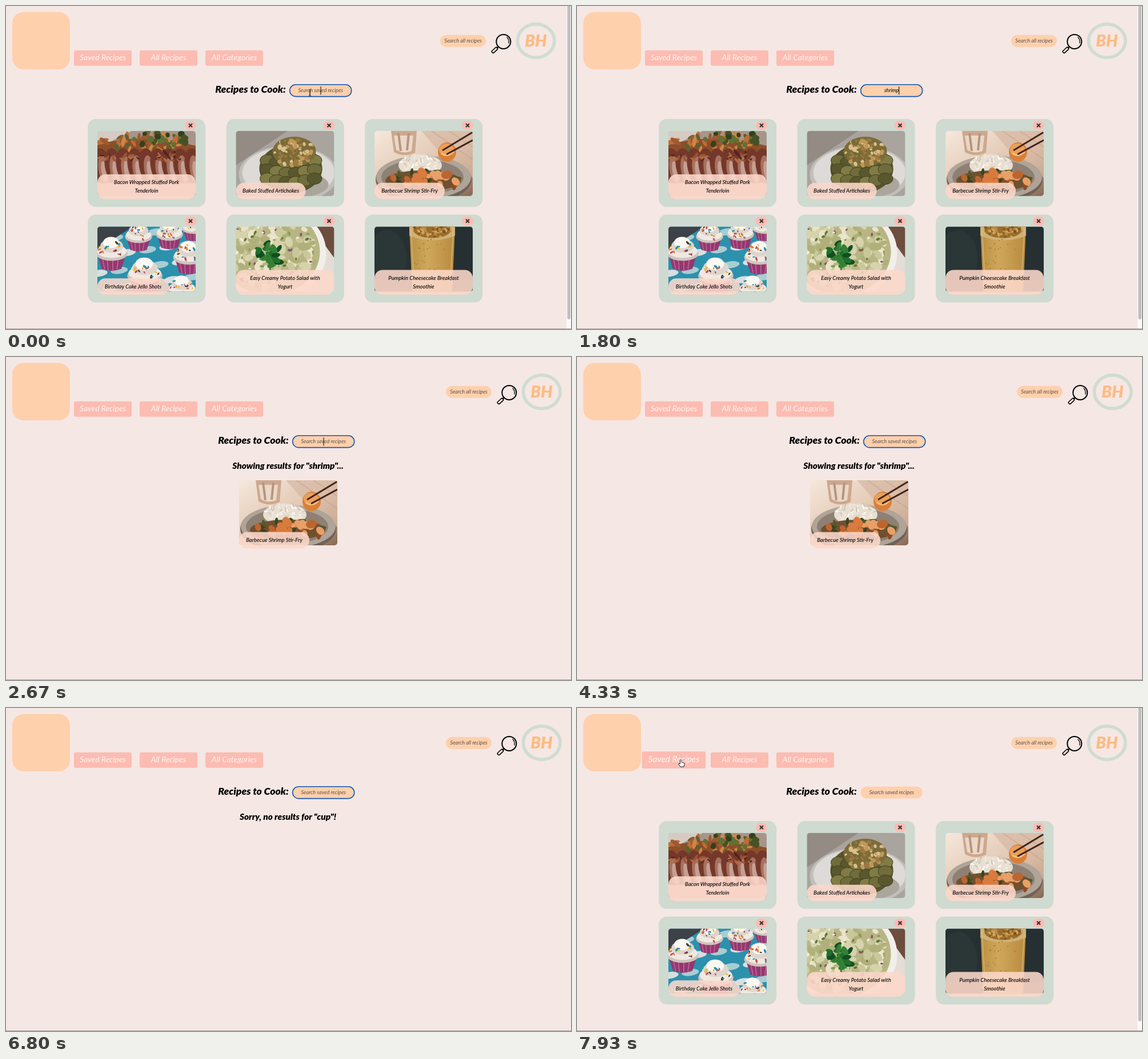
An HTML page for the animation above (8 s loop, 989 px wide and 566 px high).

```html
<!DOCTYPE html>
<html lang="en">
<head>
<meta charset="utf-8">
<title>Recipes to Cook</title>
<style>
  html, body { margin: 0; width: 100%; height: 100%; overflow: hidden; background: #f5e7e4; }
  svg { display: block; width: 100%; height: 100%; }
  text { font: italic 9.5px Lato, "Open Sans", sans-serif; text-anchor: middle; }
  .nav rect, .close rect { fill: #fcbcb2; }
  .nav text { font-size: 13.9px; fill: #fff4f0; }
  .heading { font-size: 17.7px; font-weight: 900; }
  .message { font-size: 15.4px; font-weight: 900; }
  .hint { font-size: 9.2px; fill: #5c504a; }
  .typed { font-size: 9px; }
  .initials { font-size: 28.5px; font-weight: 900; fill: #febb81; }
  .caption rect { fill: #fdd9cb; fill-opacity: .88; }
  .caption text { font-weight: 500; }
  .line { fill: none; stroke: #000; stroke-width: 2; stroke-linecap: round; }
</style>
</head>
<body>
<svg id="stage" viewBox="0 0 989 566" preserveAspectRatio="none"></svg>
<script>
const LOOP = 8000;
const stage = document.getElementById('stage');

const box = (x, y, w, h, r, fill) =>
  `<rect x="${x}" y="${y}" width="${w}" height="${h}" rx="${r}" fill="${fill}"/>`;
const oval = (x, y, rx, ry, fill, extra = '') =>
  `<ellipse cx="${x}" cy="${y}" rx="${rx}" ry="${ry}" fill="${fill}" ${extra}/>`;
const shape = (d, fill, extra = '') => `<path d="${d}" fill="${fill}" ${extra}/>`;
const label = (x, y, words, cls = '', id = '') =>
  `<text x="${x}" y="${y}" class="${cls}" ${id && `id="${id}"`}>${words}</text>`;
const range = n => [...Array(n).keys()];

function randomizer(seed) {
  return () => (seed = (seed * 16807) % 2147483647) / 2147483647;
}

// Fills an oval area with small randomly turned flecks.
function scatter(seed, count, [x, y, rx, ry], [w, h], colors) {
  const rnd = randomizer(seed * 7919);
  return range(count).map(i => {
    const angle = rnd() * 6.283, reach = Math.sqrt(rnd()), k = .6 + rnd() * .7;
    const px = (x + Math.cos(angle) * reach * rx).toFixed(1);
    const py = (y + Math.sin(angle) * reach * ry).toFixed(1);
    return oval(px, py, (w * k).toFixed(1), (h * k).toFixed(1), colors[i % colors.length],
      `transform="rotate(${Math.round(rnd() * 180)} ${px} ${py})"`);
  }).join('');
}

function pork() {
  const slices = range(9).map(i => {
    const x = 8 + i * 20;
    return oval(x, 61, 15, 31, '#74382a', `transform="rotate(-9 ${x} 61)"`) +
      oval(x + 3, 68, 9, 25, '#a87060', `transform="rotate(-9 ${x} 68)"`) +
      oval(x + 4, 71, 5, 18, '#c4a092', `transform="rotate(-9 ${x} 71)"`);
  }).join('');
  return box(0, 0, 172, 114, 0, '#a8958a') + shape('M0 0H60L0 30Z', '#d5cbc3') +
    shape('M0 24Q75 2 172 26V70H0Z', '#8d4e2a') +
    scatter(3, 42, [78, 19, 76, 15], [9, 3.5], ['#c06d34', '#9c5a32', '#5f602d', '#cf8545']) +
    scatter(5, 20, [108, 14, 54, 13], [6, 5], ['#465125', '#627033', '#343f1d']) +
    box(0, 39, 172, 51, 0, '#73382a') + slices +
    scatter(7, 28, [86, 46, 86, 10], [6, 2], ['#9b5436', '#542519', '#ae6943']) +
    box(0, 92, 172, 22, 0, '#d8b9ac');
}

function artichoke() {
  const leaves = range(3).map(r => range(6).map(i => {
    const x = 55 + i * 16.5, y = 59 + r * 16 - Math.abs(i - 2.5) * 3;
    return oval(x, y, 13, 10, ['#706c3b', '#59572d', '#817b45'][(i + r) % 3],
      'stroke="#424020" stroke-width="1"');
  }).join('')).join('');
  return box(0, 0, 172, 114, 0, '#aaa49e') + shape('M0 0H90L0 60Z', '#938b84') +
    oval(92, 76, 87, 50, '#c2bfba') + oval(92, 73, 81, 45, '#dddad7') +
    oval(102, 94, 60, 23, '#aaa69d') + oval(96, 66, 55, 43, '#57532d') + leaves +
    oval(102, 36, 38, 26, '#7c6c3a') +
    scatter(8, 85, [102, 36, 36, 25], [4, 3], ['#bd9858', '#dbc08a', '#9e783f', '#776a36']);
}

function shrimp() {
  return box(0, 0, 172, 114, 0, 'url(#table)') + shape('M82 0H172V82L115 38Z', '#d8b8a3', 'opacity=".7"') +
    shape('M100 0L172 50M130 0L172 28', 'none', 'stroke="#c4a08b" stroke-width="2" opacity=".5"') +
    shape('M29 0H74L71 38Q52 47 34 37Z', '#cda88d') + shape('M34 8H68L65 35Q50 41 38 33Z', '#ead8c8') +
    shape('M42 4L46 35M60 4L57 34', 'none', 'stroke="#b7957f" stroke-width="4"') +
    oval(86, 85, 84, 41, '#6f6259') + oval(86, 81, 83, 38, '#b0a397') + oval(84, 81, 72, 31, '#8f8074') +
    oval(80, 60, 38, 19, '#e8dfd3') +
    scatter(2, 55, [80, 58, 37, 17], [4, 1.4], ['#fffaf1', '#d3c6b6', '#f1e7da']) +
    oval(85, 87, 66, 18, '#70502f') +
    scatter(6, 17, [88, 85, 62, 15], [10, 4], ['#39451f', '#525a2a', '#8d4c24']) +
    scatter(13, 20, [87, 84, 60, 12], [8, 6], ['#d97b3e', '#e8a068', '#bd6530']) +
    oval(127, 37, 16, 17, '#d98038') + oval(126, 33, 13, 11, '#eaa05a') +
    shape('M117 39Q128 47 139 36', 'none', 'stroke="#f8bc79" stroke-width="3"') +
    shape('M119 34L172 2M126 41L172 16', 'none', 'stroke="#41251d" stroke-width="3"');
}

function cupcake(x, y, size, seed) {
  return `<g transform="translate(${x} ${y}) scale(${size})">` +
    shape('M-25 3H25L17 29Q0 36 -17 29Z', '#93386f') +
    shape('M-17 8L-12 30M-8 9L-6 32M2 9V33M12 9L9 31', 'none', 'stroke="#bd5c95" stroke-width="2"') +
    oval(0, 2, 28, 13, '#cfc4bd') + oval(0, -2, 26, 12, '#efe9e2') +
    oval(0, -11, 20, 12, '#ded5ce') + oval(-1, -17, 14, 10, '#fbf8f2') +
    scatter(seed, 15, [0, -5, 23, 15], [3, 1.5], ['#e37b36', '#328fa6', '#c64961', '#e4bf39', '#48372f']) + '</g>';
}

function cupcakes() {
  const tiles = range(24).map(i =>
    oval((i % 6) * 36 - (i / 6 & 1) * 18, 12 + (i / 6 | 0) * 29, 15, 6,
      i % 2 ? '#a8cdd2' : '#d8dfdf', 'transform="rotate(-8 86 57)"')).join('');
  return box(0, 0, 172, 114, 0, '#2c91ad') + tiles + shape('M0 0H62L0 40Z', '#3d4148') +
    cupcake(72, 16, .85, 2) + cupcake(126, 12, .85, 4) + cupcake(168, 2, .72, 12) +
    cupcake(25, 45, 1, 7) + cupcake(160, 52, .98, 9) + cupcake(83, 84, 1.1, 11) + cupcake(148, 110, .9, 15);
}

function salad() {
  return box(0, 0, 172, 114, 0, '#e3ddd6') + shape('M132 0H172V55Z', '#6c4d3e') +
    oval(64, 46, 94, 82, '#f2efea') + oval(60, 44, 87, 76, '#b7b584') +
    scatter(4, 130, [61, 46, 80, 66], [9, 6], ['#d6d3ac', '#e9e3c8', '#b0b07a', '#c9c89b']) +
    scatter(9, 75, [61, 46, 80, 64], [3, 1.8], ['#5f7636', '#8b9c51', '#8c5275', '#f0eed9']) +
    scatter(17, 26, [58, 49, 23, 21], [9, 4.5], ['#20702c', '#0f4f22', '#347f36']) +
    shape('M56 48L70 70M56 48L40 58M56 48L59 28', 'none', 'stroke="#4c9339" stroke-width="1.2"');
}

function smoothie() {
  return box(0, 0, 172, 114, 0, '#263032') + oval(22, 56, 34, 50, '#2b3636') + box(0, 94, 172, 20, 0, '#4b4440') +
    shape('M61 0H141L136 114H66Z', 'url(#drink)') + shape('M61 0H141V16Q101 32 61 16Z', '#cfb175') +
    oval(101, 6, 33, 14, '#9b6e2c') +
    scatter(12, 70, [101, 5, 34, 14], [3, 2], ['#bc8b43', '#805321', '#d0a45c']) +
    scatter(21, 35, [101, 60, 32, 43], [1, 1], ['#aa7c36']) +
    shape('M64 4L70 110M138 4L132 110', 'none', 'stroke="#dcc07e" stroke-width="1.6" opacity=".7"');
}

// A photo with its caption; the caption hangs below the picture's edge.
function dish(photo, lines, width) {
  const h = 14 + 14.7 * lines.length;
  return `<g clip-path="url(#photo)">${photo()}</g>
    <g class="caption">${box(0, 119.5 - h, width, h, 14, '')}` +
    lines.map((line, i) => label(width / 2, 108 - 15 * (lines.length - 1 - i), line)).join('') + '</g>';
}

const stirFry = dish(shrimp, ['Barbecue Shrimp Stir-Fry'], 123);
const dishes = [
  dish(pork, ['Bacon Wrapped Stuffed Pork', 'Tenderloin'], 172),
  dish(artichoke, ['Baked Stuffed Artichokes'], 122),
  stirFry,
  dish(cupcakes, ['Birthday Cake Jello Shots'], 125),
  dish(salad, ['Easy Creamy Potato Salad with', 'Yogurt'], 172),
  dish(smoothie, ['Pumpkin Cheesecake Breakfast', 'Smoothie'], 172)
];

const card = (content, i) => `<g transform="translate(${143.2 + i % 3 * 242.5} ${198 + (i / 3 | 0) * 167.5})">
  ${box(0, 0, 206, 154, 14, '#cfdad1')}
  <g class="close">${box(169.8, 3.5, 20, 15.5, 7.7, '')}
    <path d="M176.8 8.2l6 6m0-6l-6 6" stroke="#3b3030" stroke-width="2.2"/></g>
  <g transform="translate(16.8 21)">${content}</g></g>`;

const navButton = (name, i) => `<g class="nav" id="nav${i}">
  ${box(119 + 115 * i, 77.7, 101, 27, 3, '')}${label(169.5 + 115 * i, 95, name)}</g>`;

stage.innerHTML = `
  <defs>
    <clipPath id="photo"><rect width="172" height="114" rx="5"/></clipPath>
    <linearGradient id="table" y2="1"><stop stop-color="#f5e8dc"/><stop offset=".6" stop-color="#dfc3ac"/>
      <stop offset="1" stop-color="#866753"/></linearGradient>
    <linearGradient id="drink"><stop stop-color="#b98f43"/><stop offset=".4" stop-color="#cfa75b"/>
      <stop offset="1" stop-color="#b88b3f"/></linearGradient>
  </defs>
  ${box(0, 0, 989, 566, 0, '#f5e7e4')}
  ${box(11, 10.5, 101, 100.5, 20, '#fed0ac')}
  ${['Saved Recipes', 'All Recipes', 'All Categories'].map(navButton).join('')}
  <g id="tools">
    ${box(760, 50.7, 80, 21, 10.5, '#fed0ac')}${label(800, 64, 'Search all recipes', 'hint')}
    <g class="line"><circle cx="870.8" cy="62.4" r="12.5"/><path d="M877 55q4 4 3 10" stroke-width="1.3"/>
      <path d="M861.5 71.5l-2 2"/>
      <rect x="849.5" y="75" width="12" height="4.6" rx="1.8" stroke-width="1.6" transform="rotate(-43 855.5 77.3)"/></g>
    <ellipse cx="927.7" cy="61" rx="32.3" ry="29.3" fill="none" stroke="#cfdcd1" stroke-width="5.6"/>
    ${label(927.5, 70.5, 'BH', 'initials')}
  </g>
  <g id="search">
    ${label(428, 152, 'Recipes to Cook:', 'heading')}
    <rect id="field" x="496.7" y="137.8" width="108" height="20.8" rx="10.4" fill="#fed0ac" stroke="#1356b0" stroke-width="1.6"/>
    ${label(550.7, 151, 'Search saved recipes', 'hint', 'hint')}
    ${label(550.7, 151, '', 'typed', 'typed')}
    <rect id="caret" y="141" width="1" height="14.5"/>
  </g>
  <g id="grid">${dishes.map(card).join('')}
    ${box(981, 0, 8, 566, 0, '#fafafa')}${box(982.5, -4, 5.5, 553, 2.7, '#bebebe')}</g>
  <g id="found">${label(493.5, 195.5, 'Showing results for "shrimp"...', 'message')}
    <g transform="translate(408 216)">${stirFry}</g></g>
  <g id="none">${label(493.5, 195.5, 'Sorry, no results for "cup"!', 'message')}</g>
  ${box(0, 565, 989, 1, 0, '#aaa3a1')}
  <g id="beam"><path d="M-2-5.5q2 0 2 1.5v8q0 1.5-2 1.5M2-5.5q-2 0-2 1.5v8q0 1.5 2 1.5" fill="none" stroke="#222"/></g>
  <g id="arrow"><path d="M0 0v12l3-3 2 4 2-1-2-4h4z" stroke="#fff"/></g>
  <g id="hand"><path d="M-1.5 0Q0-1.5 1 .5V4L5 5Q6.5 5.5 6 8L5 12H-1L-4 7.5Q-4.5 6-3 6L-1.5 7Z"
    fill="#fff" stroke="#222"/></g>`;

const $ = id => document.getElementById(id);
const show = (id, on) => { $(id).style.display = on ? '' : 'none'; };
const shift = (id, x, y = 0) => $(id).setAttribute('transform', `translate(${x} ${y})`);
const clamp = v => Math.max(0, Math.min(1, v));
const smooth = v => v * v * (3 - 2 * v);

const entries = [
  { word: 'shrimp', start: 870, step: 130, submit: 2400 },
  { word: 'cup', start: 4600, step: 140, submit: 5300 }
];
const caretOn = [[0, 430], [870, 2030], [2400, 2900], [3400, 3900], [4400, 5800], [6300, 6800], [7300, 7750]];
const BLUR = 7750, RELOAD = 7930;

function typedAt(t) {
  const entry = entries.find(e => t >= e.start && t < e.submit);
  return entry ? entry.word.slice(0, 1 + Math.floor((t - entry.start) / entry.step)) : '';
}

function renderPointer(t) {
  const k = smooth(clamp((t - 7200) / 400));
  const x = 532 - 350 * k, y = 152 - 61 * k;
  const visible = t < 870 || t >= 7200;
  const kind = x > 496 ? 'beam' : x < 222 ? 'hand' : 'arrow';
  for (const id of ['beam', 'arrow', 'hand']) {
    show(id, visible && id === kind);
    shift(id, x, y);
  }
  const scale = 1 + .105 * smooth(clamp((t - 7500) / 150));
  $('nav0').setAttribute('transform', `translate(169.5 91.2) scale(${scale}) translate(-169.5 -91.2)`);
}

function render(t) {
  const grid = t < entries[0].submit || t >= RELOAD;
  const found = !grid && t < entries[1].submit;
  show('grid', grid);
  show('found', found);
  show('none', !grid && !found);
  shift('tools', grid ? 0 : 10);
  shift('search', grid ? 0 : 5);

  const word = typedAt(t);
  $('typed').textContent = word;
  show('hint', !word);
  $('field').style.strokeOpacity = t < BLUR ? 1 : 0;
  $('caret').setAttribute('x', 550.5 + (word ? $('typed').getComputedTextLength() / 2 : 0));
  show('caret', caretOn.some(([from, to]) => t >= from && t < to));
  renderPointer(t);
}

const began = performance.now();
function tick() {
  render((performance.now() - began) % LOOP);
  requestAnimationFrame(tick);
}
tick();
</script>
</body>
</html>
```
